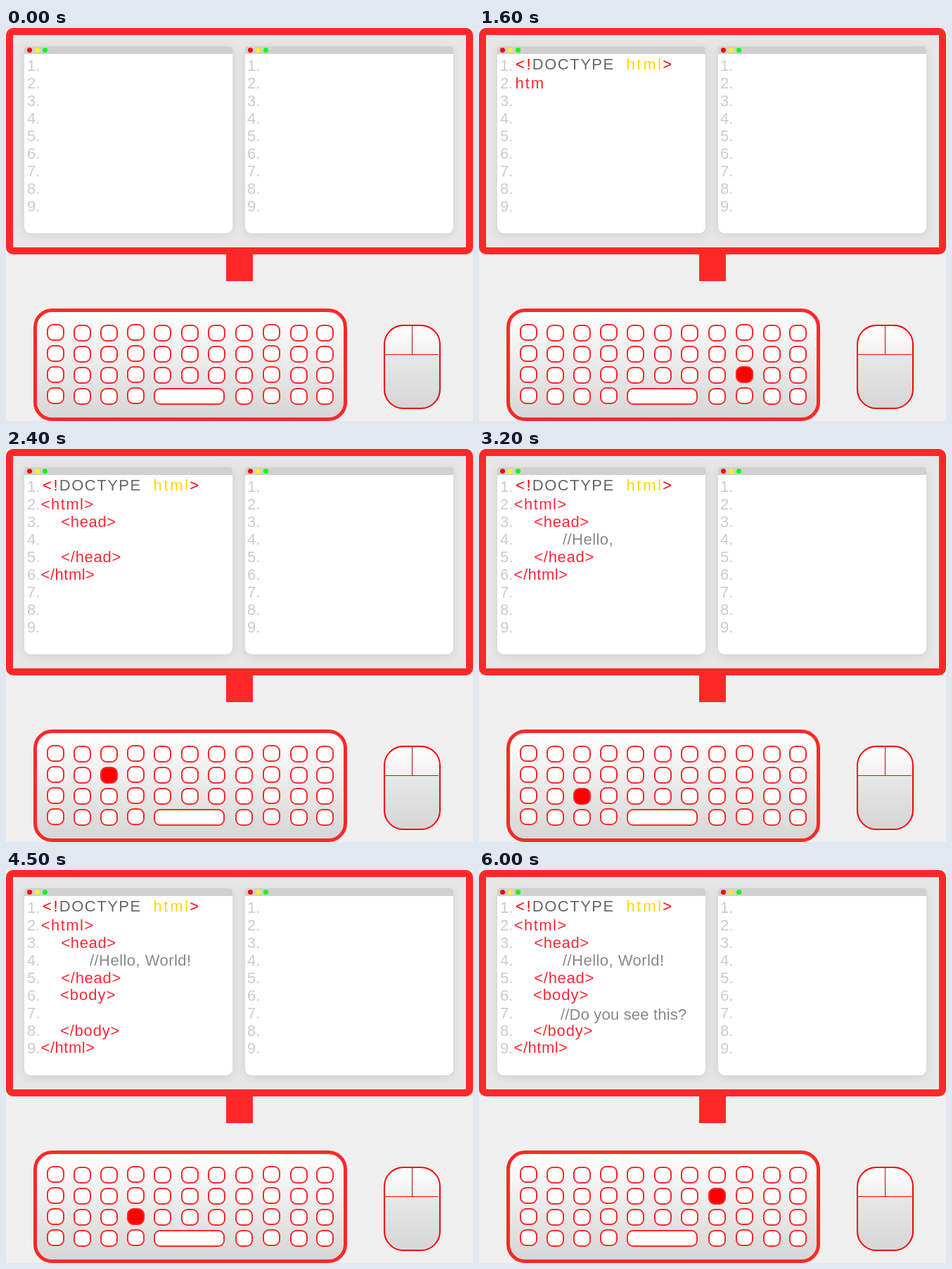
Animation of 664x559 px, one loop 6100 ms. Source, as an HTML page with a canvas:

```html
<!DOCTYPE html>
<html lang="en">
<head>
<meta charset="utf-8">
<title>Typing code</title>
<style>
html, body { margin: 0; width: 664px; height: 559px; overflow: hidden; background: #efefef; }
canvas { display: block; }
</style>
</head>
<body>
<canvas id="stage" width="664" height="559"></canvas>
<script>
const ctx = document.getElementById('stage').getContext('2d');
const STEP = 100, STEPS = 61;
const RED = '#ff2828', TAG = '#ff2837', NOTE = '#888';

const columns = [58, 96, 134, 172, 210, 249, 287, 326, 365, 404, 441];
const raised = [0, 3, 8];

// One pressed key per step, written as column and row.
const presses = ('-- 21 50 32 13 71 42 60 33 51 80 22 91 62 40 73 82 11 52 90 23 ' +
  '61 42 70 21 83 50 12 31 61 92 40 22 71 30 52 13 80 41 62 20 ' +
  '73 51 91 60 32 83 11 42 70 52 93 31 80 61 40 72 01 92 50 71').split(' ');

function box(x, y, w, h, radius, fill, stroke, width) {
  ctx.beginPath();
  ctx.roundRect(x, y, w, h, radius);
  if (fill) { ctx.fillStyle = fill; ctx.fill(); }
  if (stroke) { ctx.strokeStyle = stroke; ctx.lineWidth = width; ctx.stroke(); }
}

function rect(x, y, w, h, fill) {
  ctx.fillStyle = fill;
  ctx.fillRect(x, y, w, h);
}

function fade(top, bottom, from, to) {
  const g = ctx.createLinearGradient(0, top, 0, bottom);
  g.addColorStop(0, from);
  g.addColorStop(1, to);
  return g;
}

function text(str, x, y, color, spacing = 0) {
  ctx.font = '22px "Liberation Sans", Arial, sans-serif';
  ctx.letterSpacing = spacing + 'px';
  ctx.fillStyle = color;
  ctx.fillText(str, x, y);
}

// The first `count` visible letters; spaces take no time.
function typed(str, count) {
  let out = '';
  for (const ch of str) {
    if (ch !== ' ' && count-- <= 0) break;
    out += ch;
  }
  return out;
}

function drawWindow(x) {
  ctx.save();
  ctx.shadowColor = 'rgba(0,0,0,.1)';
  ctx.shadowBlur = 14;
  ctx.shadowOffsetY = 3;
  box(x, 26, 296, 266, [4, 4, 9, 9], '#fff');
  ctx.restore();
  box(x, 26, 296, 11, [4, 4, 0, 0], '#d0d0d0');
  ['#f00', '#ffee22', '#0f0'].forEach((color, i) =>
    box(x + 4 + i * 11, 28, 7, 7, 3.5, color));
  for (let i = 0; i < 9; i++) text(i + 1 + '.', x + (x < 300 ? 4 : 3), 61 + i * 25, '#ccc');
}

function drawMonitor() {
  box(0, 0, 664, 322, 10, RED);
  rect(10, 10, 644, 302, '#e7e7e7');
  rect(313, 322, 38, 38, RED);
  drawWindow(26);
  drawWindow(340);
}

function drawKeyboard(step) {
  box(41.5, 401.5, 441, 155, 24, fade(404, 554, '#fff', '#d6d6d6'), RED, 5);
  columns.forEach((x, col) => {
    for (let row = 0; row < 4; row++) {
      if (row === 3 && col > 3 && col < 7) continue;
      const y = (raised.includes(col) ? 421 : 422) + row * 30;
      const down = presses[step] === `${col}${row}`;
      box(x + 1, y + 1, 23, 22, 8, down ? '#f00' : '#fff', RED, 2);
    }
  });
  box(211, 513, 99, 22, 8, '#fff', RED, 2);
}

function drawMouse() {
  box(538, 423, 79, 118, 27, fade(465, 541, '#e7e7e7', '#d6d6d6'));
  box(538, 423, 79, 41, [27, 27, 0, 0], fade(423, 464, '#fff', '#f0f0f0'));
  rect(577, 424, 1, 40, '#b01010');
  rect(539, 464, 76, 1, '#f00');
  box(538, 423, 79, 118, 27, null, '#f00', 2);
}

function drawDoctype(step) {
  text(typed('<!', step), 52, 59, '#f00', 2.6);
  text(typed('DOCTYPE', step - 2), 75.8, 59, '#666', 1.5);
  text(typed('html', step - 9), 209.4, 59, '#ffd800', 2.7);
  if (step >= 13) text('>', 261.3, 59, '#f00');
}

function closeHtml(line) {
  text('</html>', 49.6, line === 9 ? 260 : 36 + line * 25, TAG, 0.5);
}

function drawCode(step) {
  drawDoctype(step);

  if (step < 18) {
    text(typed('html', step - 13), 51.5, 86, TAG, 2);
  } else {
    text('<html>', 49.8, 86, TAG, 1.4);
    closeHtml(step < 19 ? 3 : step < 24 ? 4 : step < 39 ? 6 : step < 45 ? 7 : 9);
  }

  if (step < 24) {
    text(typed('head', step - 19), 79, 111, TAG, 0.7);
  } else {
    text('<head>', 78.3, 111, TAG, 0.65);
    text('</head>', 78.3, 161, TAG, 0.7);
  }
  text(typed('//Hello, World!', step - 24), 119, 136, NOTE, 0.45);

  if (step < 44) {
    text(typed('body', step - 39), 78, 185, TAG, 1);
  } else {
    text('<body>', 77, 185, TAG, 1);
    if (step === 44) text('</body>', 155, 185, TAG, 0.8);
    else text('</body>', 77, 236, TAG, 0.8);
  }
  text(typed('//Do you see this?', step - 45), 116, 213, NOTE, 0.18);
}

let start;
function frame(now) {
  start ??= now;
  const step = Math.floor((now - start) / STEP) % STEPS;
  rect(0, 0, 664, 559, '#efefef');
  drawMonitor();
  drawKeyboard(step);
  drawMouse();
  drawCode(step);
  requestAnimationFrame(frame);
}
requestAnimationFrame(frame);
</script>
</body>
</html>
```
